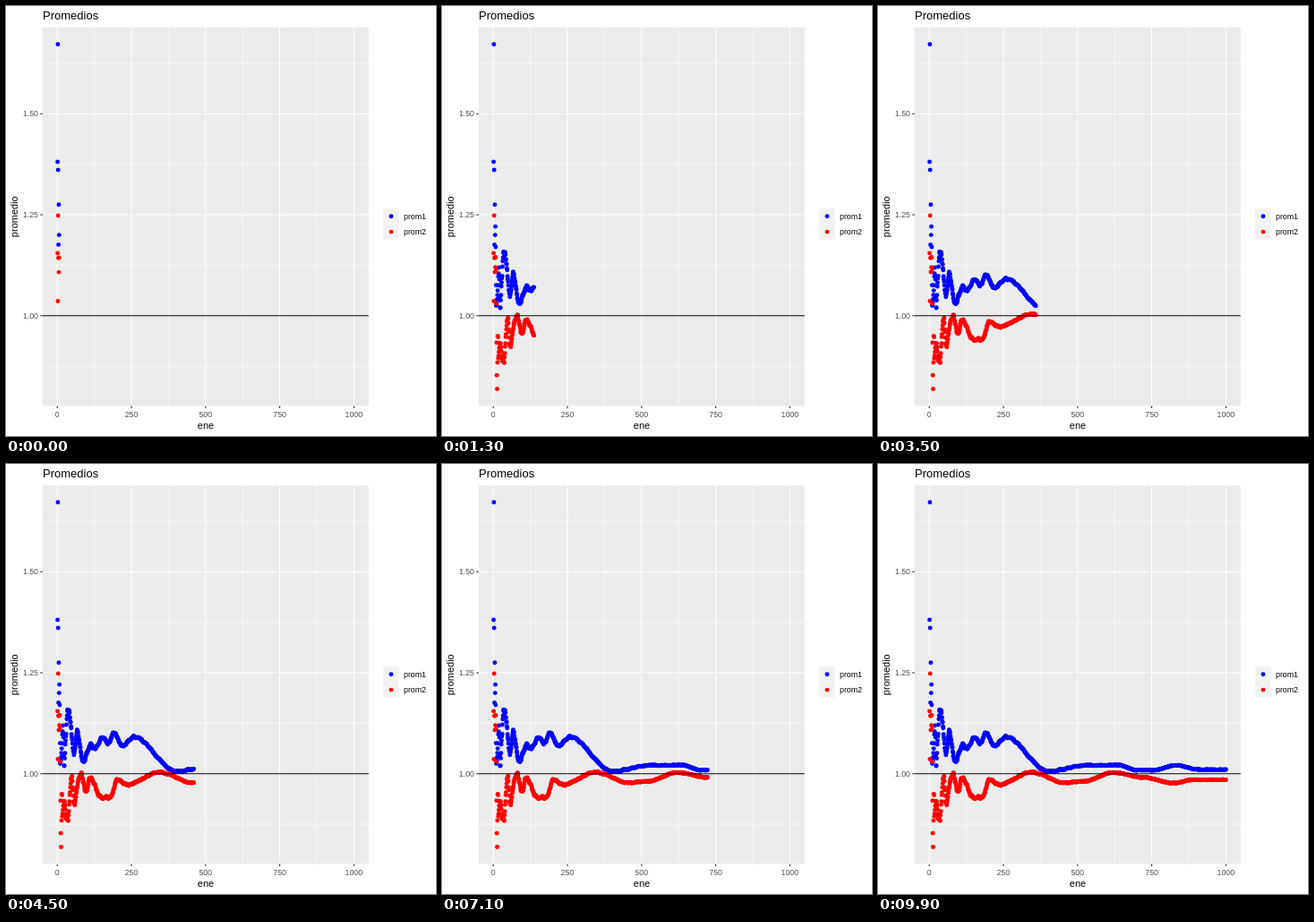
Write an HTML page with a canvas that moves like this. It is 480 by 480 pixels and loops after 10 s.

```html
<!DOCTYPE html>
<html lang="es">
<head>
<meta charset="utf-8">
<title>Promedios</title>
<style>
html, body { margin: 0; width: 100%; height: 100%; overflow: hidden; background: #fff; }
canvas { display: block; }
</style>
</head>
<body>
<canvas id="stage" width="480" height="480"></canvas>
<script>
const ctx = document.getElementById('stage').getContext('2d');
const TOTAL = 1000, STEPS = 100, STEP_MS = 100;
const PANEL = { left: 41, top: 24, right: 404.8, bottom: 446.4 };
const px = n => 57.25 + n * 0.3311;
const py = v => 345.8 - (v - 1) * 451;

// start: the first averages; turns: later [n, average] where the curve turns
const series = [
  {
    name: 'prom1', color: '#0000ff', seed: 7,
    start: [1.381, 1.672, 1.361, 1.176, 1.275, 1.2, 1.221],
    turns: [[10, 1.025], [20, 1.1], [23, 1.03], [37, 1.165], [57, 1.052], [66, 1.108], [88, 1.032],
      [114, 1.073], [122, 1.062], [156, 1.092], [172, 1.076], [192, 1.102], [220, 1.068],
      [258, 1.092], [400, 1.006], [535, 1.021], [635, 1.022], [700, 1.009], [755, 1.009],
      [833, 1.021], [910, 1.01], [1000, 1.01]]
  },
  {
    name: 'prom2', color: '#ff0000', seed: 23,
    start: [1.155, 1.036, 1.248, 1.143, 1.108, 1.144, 1.12],
    turns: [[8, 1.145], [13, 0.819], [15, 0.95], [18, 0.89], [23, 0.93], [36, 0.89], [49, 1],
      [57, 0.935], [79, 0.996], [98, 0.957], [109, 0.99], [150, 0.94], [180, 0.942],
      [202, 0.985], [235, 0.973], [345, 1.004], [455, 0.978], [520, 0.981], [620, 1.003],
      [720, 0.991], [824, 0.977], [890, 0.985], [1000, 0.985]]
  }
];

function random(seed) {
  return () => (seed = (seed * 16807) % 2147483647) / 2147483647;
}

// Eases from turn to turn, with a wobble that fades as the sample grows
function averages({ start, turns, seed }) {
  const values = [...start], rnd = random(seed * 9973);
  let n0 = start.length, v0 = start[n0 - 1], wobble = 0;
  for (const [n1, v1] of turns) {
    for (let n = n0 + 1; n <= n1; n++) {
      const t = (n - n0) / (n1 - n0);
      if (n > 15) wobble = 0.75 * wobble + (rnd() - 0.5) * 0.7 / n;
      values.push(v0 + (v1 - v0) * t * t * (3 - 2 * t) + wobble);
    }
    n0 = n1;
    v0 = v1;
  }
  return values;
}
series.forEach(s => s.values = averages(s));

function line(x0, y0, x1, y1, color, width) {
  ctx.strokeStyle = color;
  ctx.lineWidth = width;
  ctx.beginPath();
  ctx.moveTo(x0, y0);
  ctx.lineTo(x1, y1);
  ctx.stroke();
}

function dot(x, y, color) {
  ctx.fillStyle = color;
  ctx.beginPath();
  ctx.arc(x, y, 2.45, 0, 2 * Math.PI);
  ctx.fill();
}

function text(str, x, y, size, color = '#000', align = 'left') {
  ctx.font = size + 'px "Liberation Sans", Arial, sans-serif';
  ctx.fillStyle = color;
  ctx.textAlign = align;
  ctx.fillText(str, x, y);
}

const vertical = (n, w) => line(px(n), PANEL.top, px(n), PANEL.bottom, '#fff', w);
const horizontal = (v, w, color = '#fff') => line(PANEL.left, py(v), PANEL.right, py(v), color, w);

function drawChart() {
  const { left, top, right, bottom } = PANEL;
  ctx.fillStyle = '#fff';
  ctx.fillRect(0, 0, 480, 480);
  ctx.fillStyle = '#ebebeb';
  ctx.fillRect(left, top, right - left, bottom - top);

  for (let n = 125; n < 1000; n += 250) vertical(n, 0.53);
  for (let v = 0.875; v < 1.7; v += 0.25) horizontal(v, 0.53);
  for (let n = 0; n <= 1000; n += 250) {
    vertical(n, 1.07);
    line(px(n), bottom, px(n), bottom + 2.7, '#333', 1.07);
    text(n, px(n), 459, 8.8, '#4d4d4d', 'center');
  }
  for (let v = 1; v <= 1.5; v += 0.25) {
    horizontal(v, 1.07);
    line(left - 2.7, py(v), left, py(v), '#333', 1.07);
    text(v.toFixed(2), 36, py(v) + 3.1, 8.8, '#4d4d4d', 'right');
  }

  text('Promedios', 41, 15, 13);
  text('ene', 223, 472, 11, '#000', 'center');
  ctx.save();
  ctx.translate(13, 235.2);
  ctx.rotate(-Math.PI / 2);
  text('promedio', 0, 0, 11, '#000', 'center');
  ctx.restore();

  series.forEach((s, i) => {
    const y = 226 + i * 17.28;
    ctx.fillStyle = '#f2f2f2';
    ctx.fillRect(421.2, y, 17.28, 17.28);
    dot(429.9, y + 8.8, s.color);
    text(s.name, 444, y + 12, 8.8);
  });
}

function draw(now) {
  const step = Math.floor(now / STEP_MS) % STEPS;
  const shown = Math.min(TOTAL, Math.floor(1 + (step + 0.5) * (TOTAL - 1) / (STEPS - 1)));
  drawChart();
  for (const { values, color } of series) {
    for (let i = 0; i < shown; i++) dot(px(i + 1), py(values[i]), color);
  }
  horizontal(1, 1.07, '#000');
}

const start = performance.now();
function tick() {
  draw(performance.now() - start);
  requestAnimationFrame(tick);
}
tick();
</script>
</body>
</html>
```
